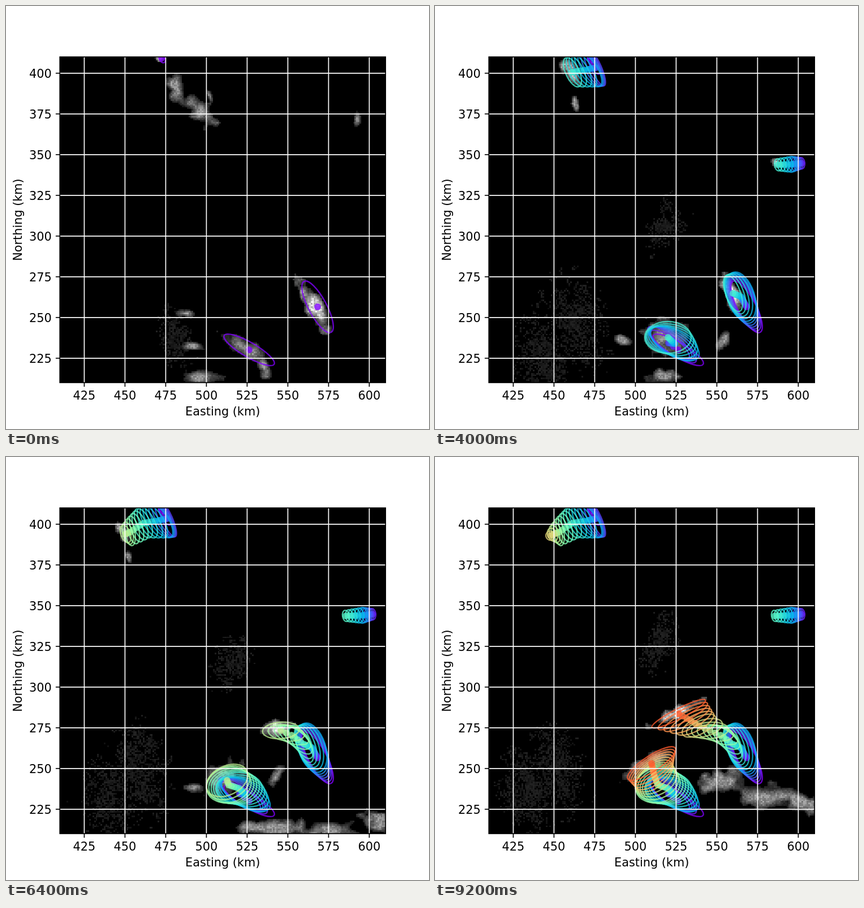
An HTML page with a canvas for the animation above (9600 ms loop, 748 px wide and 748 px high).

```html
<!DOCTYPE html>
<html lang="en">
<head>
<meta charset="utf-8">
<title>Rain cell tracks</title>
<style>
  html, body { margin: 0; width: 100%; height: 100%; overflow: hidden; background: #fff; }
  canvas { display: block; width: 748px; height: 748px; }
</style>
</head>
<body>
<canvas id="stage" width="748" height="748"></canvas>
<script>
const ctx = document.getElementById('stage').getContext('2d');
const STEP = 400, STEPS = 24, CELLS = 200, SCALE = 2.88;
const LEFT = 95.2, TOP = 90, SIZE = CELLS * SCALE, RIGHT = LEFT + SIZE, BOTTOM = TOP + SIZE;
const rad = deg => deg * Math.PI / 180;
const mix = (a, b, t) => a + (b - a) * t;

// Fitted ellipses per storm: [step, x, y, long radius, short radius, degrees]
const storms = [
  [[0, 276, 93, 8, 5, 60], [2, 285, 109, 35, 9, 66], [6, 271, 112, 36, 15, 55],
   [10, 243, 117, 28, 12, 65], [14, 219, 133, 24, 9, 80], [18, 204, 139, 8, 8, 60]],
  [[1, 648, 278, 10, 6, 85], [6, 630, 280, 14, 9, 90], [11, 601, 281, 10, 6, 80]],
  [[0, 551, 532, 51, 16, 62], [6, 541, 514, 45, 24, 72], [10, 527, 508, 34, 13, 70],
   [14, 505, 492, 32, 14, 20], [18, 467, 475, 33, 15, -28], [23, 431, 454, 53, 9, -27]],
  [[0, 430, 608, 51, 13, 30], [2, 413, 596, 45, 14, 37], [6, 424, 597, 48, 22, 30], [10, 412, 586, 41, 28, 0],
   [14, 394, 580, 40, 31, -15], [18, 388, 564, 38, 20, -38], [23, 383, 542, 50, 14, -33]]
];
const stormLevel = [.8, .85, 1, .65];

// Other drifting rain: [first step, x, y, last step, x, y, long radius, degrees]
const drifts = [
  [0, 301, 145, 2, 299, 158, 30, 75],
  [0, 345, 187, 3, 330, 190, 36, 50],
  [0, 360, 158, 6, 305, 204, 11, 60],
  [3, 285, 165, 18, 207, 180, 12, 80],
  [3, 258, 94, 18, 190, 128, 14, 85],
  [0, 621, 198, 6, 590, 190, 14, 90],
  [7, 530, 600, 18, 465, 560, 20, -60],
  [0, 456, 638, 9, 455, 655, 22, 80],
  [0, 318, 543, 3, 313, 546, 15, 0],
  [0, 328, 602, 18, 335, 582, 18, 10],
  [0, 350, 655, 18, 450, 655, 28, 0],
  [12, 670, 665, 23, 650, 612, 34, 15],
  [15, 570, 670, 23, 590, 600, 44, 5],
  [15, 480, 670, 23, 505, 573, 44, -10],
  [0, 300, 590, 6, 290, 540, 50, 80],
  [3, 205, 640, 23, 165, 585, 78, 80],
  [7, 260, 560, 23, 215, 550, 80, 75],
  [3, 415, 425, 23, 395, 328, 50, -60]
];

function hash(x, y, seed = 0) {
  const h = Math.sin(x * 127.1 + y * 311.7 + seed * 74.7) * 43758.5453;
  return h - Math.floor(h);
}

function smoothNoise(x, y, seed) {
  const ix = Math.floor(x), iy = Math.floor(y), u = x - ix, v = y - iy;
  return mix(mix(hash(ix, iy, seed), hash(ix + 1, iy, seed), u),
             mix(hash(ix, iy + 1, seed), hash(ix + 1, iy + 1, seed), u), v);
}

function poseAt(keys, step) {
  const i = keys.findIndex(key => key[0] >= step);
  if (keys[i][0] === step) return keys[i].slice(1);
  const from = keys[i - 1], to = keys[i], t = (step - from[0]) / (to[0] - from[0]);
  return from.map((v, j) => mix(v, to[j], t)).slice(1);
}

const lastStep = keys => keys[keys.length - 1][0];

const radar = document.createElement('canvas');
radar.width = radar.height = CELLS;
const radarCtx = radar.getContext('2d');

function addBlob(field, step, px, py, a, b, deg, level) {
  const cx = (px - LEFT) / SCALE, cy = (py - TOP) / SCALE, faint = level < .2;
  const c = Math.cos(rad(deg)), s = Math.sin(rad(deg)), reach = Math.ceil(a * 1.5 / SCALE);
  const low = v => Math.max(0, Math.floor(v - reach)), high = v => Math.min(CELLS - 1, Math.ceil(v + reach));
  for (let y = low(cy); y <= high(cy); y++) {
    for (let x = low(cx); x <= high(cx); x++) {
      const dx = (x + .5 - cx) * SCALE, dy = (y + .5 - cy) * SCALE;
      const d = Math.hypot((dx * c + dy * s) / a, (dy * c - dx * s) / b);
      const edge = 1.08 - d + (smoothNoise(x / 4, y / 4, step) - .5) * .9;
      if (edge <= 0 || faint && hash(y, x, step + 40) > .15 + edge * .7) continue;
      const grain = hash(x, y, step), i = y * CELLS + x;
      const v = faint ? .45 + .55 * grain : Math.min(1, .2 + edge * 1.1) * (.65 + .35 * grain);
      field[i] = Math.max(field[i], level * v);
    }
  }
}

function drawRain(step) {
  const field = new Float32Array(CELLS * CELLS), image = radarCtx.createImageData(CELLS, CELLS);
  storms.forEach((keys, i) => {
    if (step < keys[0][0] || step > lastStep(keys)) return;
    const [x, y, a, b, deg] = poseAt(keys, step);
    addBlob(field, step, x - 4, y - 2, a * .9, Math.max(b, 6), deg, stormLevel[i]);
  });
  for (const [k0, x0, y0, k1, x1, y1, a, deg] of drifts) {
    if (step < k0 || step > k1) continue;
    const t = (step - k0) / (k1 - k0), faint = a > 44;
    addBlob(field, step, mix(x0, x1, t), mix(y0, y1, t), a, a * (faint ? .6 : .45), deg, faint ? .14 : .68);
  }
  field.forEach((v, i) => {
    image.data.fill(v * 255, i * 4, i * 4 + 3);
    image.data[i * 4 + 3] = 255;
  });
  radarCtx.putImageData(image, 0, 0);
  ctx.imageSmoothingEnabled = false;
  ctx.drawImage(radar, LEFT, TOP, SIZE, SIZE);
}

function rainbow(x) {
  const rgb = [Math.abs(2 * x - .5), Math.sin(Math.PI * x), Math.cos(Math.PI * x / 2)];
  return `rgba(${rgb.map(v => Math.round(Math.min(1, v) * 255))},.78)`;
}

function drawTracks(step) {
  ctx.save();
  ctx.beginPath();
  ctx.rect(LEFT, TOP, SIZE, SIZE);
  ctx.clip();
  ctx.lineWidth = 2.4;
  for (const keys of storms) {
    for (let k = keys[0][0]; k <= Math.min(step, lastStep(keys)); k++) {
      const [x, y, a, b, deg] = poseAt(keys, k);
      ctx.strokeStyle = ctx.fillStyle = rainbow(k / 26);
      ctx.beginPath();
      ctx.ellipse(x, y, a, b, rad(deg), 0, 7);
      ctx.stroke();
      ctx.beginPath();
      ctx.arc(x, y, Math.min(6, b), 0, 7);
      ctx.fill();
    }
  }
  ctx.restore();
}

function line(x0, y0, x1, y1, color) {
  ctx.strokeStyle = color;
  ctx.beginPath();
  ctx.moveTo(x0, y0);
  ctx.lineTo(x1, y1);
  ctx.stroke();
}

function drawAxes() {
  ctx.lineWidth = 1.67;
  ctx.fillStyle = '#000';
  ctx.font = '20.8px "DejaVu Sans", sans-serif';
  for (let km = 425; km <= 600; km += 25) {
    const x = LEFT + (km - 410) * SCALE;
    line(x, TOP, x, BOTTOM, '#fff');
    line(x, BOTTOM, x, BOTTOM + 7.3, '#000');
    ctx.textAlign = 'center';
    ctx.fillText(km, x, 696);
  }
  for (let km = 225; km <= 400; km += 25) {
    const y = BOTTOM - (km - 210) * SCALE;
    line(LEFT, y, RIGHT, y, '#fff');
    line(LEFT - 7.3, y, LEFT, y, '#000');
    ctx.textAlign = 'right';
    ctx.fillText(km, 80.7, y + 7.8);
  }
  ctx.strokeStyle = '#000';
  ctx.strokeRect(LEFT, TOP, SIZE, SIZE);
  ctx.textAlign = 'center';
  ctx.fillText('Easting (km)', LEFT + SIZE / 2, 724);
  ctx.save();
  ctx.translate(28, TOP + SIZE / 2);
  ctx.rotate(-Math.PI / 2);
  ctx.fillText('Northing (km)', 0, 0);
  ctx.restore();
}

let shown = -1;
function tick() {
  const step = Math.floor(performance.now() / STEP) % STEPS;
  if (step !== shown) {
    shown = step;
    ctx.fillStyle = '#fff';
    ctx.fillRect(0, 0, 748, 748);
    drawRain(step);
    drawTracks(step);
    drawAxes();
  }
  requestAnimationFrame(tick);
}
tick();
</script>
</body>
</html>
```
